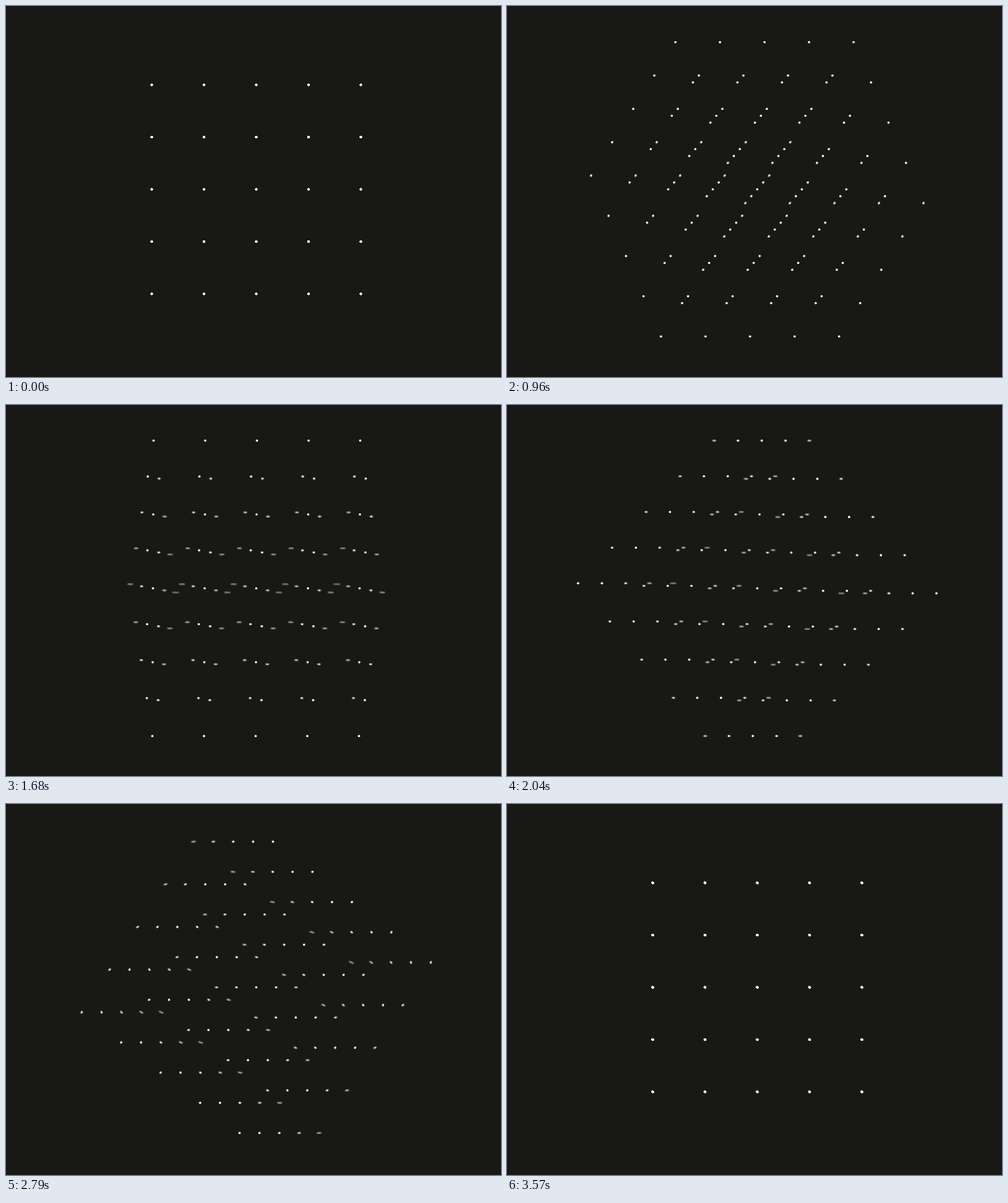
Recreate the animation shown at these times as an HTML page with a canvas. Size 800 by 600 pixels, loop 3.6 s.

```html
<!DOCTYPE html>
<html lang="en">
<head>
<meta charset="utf-8">
<title>Turning lattice</title>
<style>
  html, body { margin: 0; width: 100%; height: 100%; overflow: hidden; background: #181816; }
  canvas { display: block; width: 800px; height: 600px; }
</style>
</head>
<body>
<canvas id="stage" width="800" height="600"></canvas>
<script>
const ctx = document.getElementById('stage').getContext('2d');
const LOOP = 3600, STEP = 30;
const CX = 404.5, CY = 296.5, GAP = 84.5, RADIUS = 1.8;
const SHUTTER = 0.5, SAMPLES = 14;
const ISO = Math.atan(Math.SQRT1_2) * 180 / Math.PI;

// Face, corner and edge views: [tilt, turn] in degrees
const VIEWS = [[0, 0], [45, ISO], [45, -90], [0, 0]];
const COORDS = [-2, -1, 0, 1, 2];

const rad = deg => deg * Math.PI / 180;
const mix = (a, b, k) => a + (b - a) * k;
const smooth = (from, to, x) => {
  const u = Math.min(1, Math.max(0, (x - from) / (to - from)));
  return u * u * (3 - 2 * u);
};

function anglesAt(ms) {
  const t = ((ms / LOOP) % 1 + 1) % 1;
  const leg = Math.min(2, Math.floor(t * 3));
  const k = smooth(0, 1, t * 3 - leg);
  const [from, to] = [VIEWS[leg], VIEWS[leg + 1]];
  const lean = 1 + 0.0866 * (smooth(0.1, 0.55, t) - 0.5);
  return [rad(mix(from[0], to[0], k) * lean), rad(mix(from[1], to[1], k))];
}

function drawLattice(ms) {
  const [tilt, turn] = anglesAt(ms);
  const ct = Math.cos(tilt), st = Math.sin(tilt);
  const cu = Math.cos(turn), su = Math.sin(turn);
  for (const i of COORDS) for (const j of COORDS) for (const k of COORDS) {
    const x = i * cu + su * (k * st - j * ct);
    const y = j * st + k * ct;
    ctx.beginPath();
    ctx.arc(CX + x * GAP, CY + y * GAP, RADIUS, 0, 2 * Math.PI);
    ctx.fill();
  }
}

// Average several moments around the step for motion blur
function render(ms) {
  ctx.globalCompositeOperation = 'source-over';
  ctx.globalAlpha = 1;
  ctx.fillStyle = '#181816';
  ctx.fillRect(0, 0, 800, 600);
  ctx.globalCompositeOperation = 'lighter';
  ctx.globalAlpha = 1 / SAMPLES;
  ctx.fillStyle = 'rgb(231,231,233)';
  for (let n = 0; n < SAMPLES; n++) {
    drawLattice(ms + ((n + 0.5) / SAMPLES - 0.5) * SHUTTER * STEP);
  }
}

let start = null, last = -1;
function tick(now) {
  if (start === null) start = now;
  const step = Math.floor(((now - start) % LOOP) / STEP + 1e-6);
  if (step !== last) render(step * STEP);
  last = step;
  requestAnimationFrame(tick);
}
render(0);
requestAnimationFrame(tick);
</script>
</body>
</html>
```
